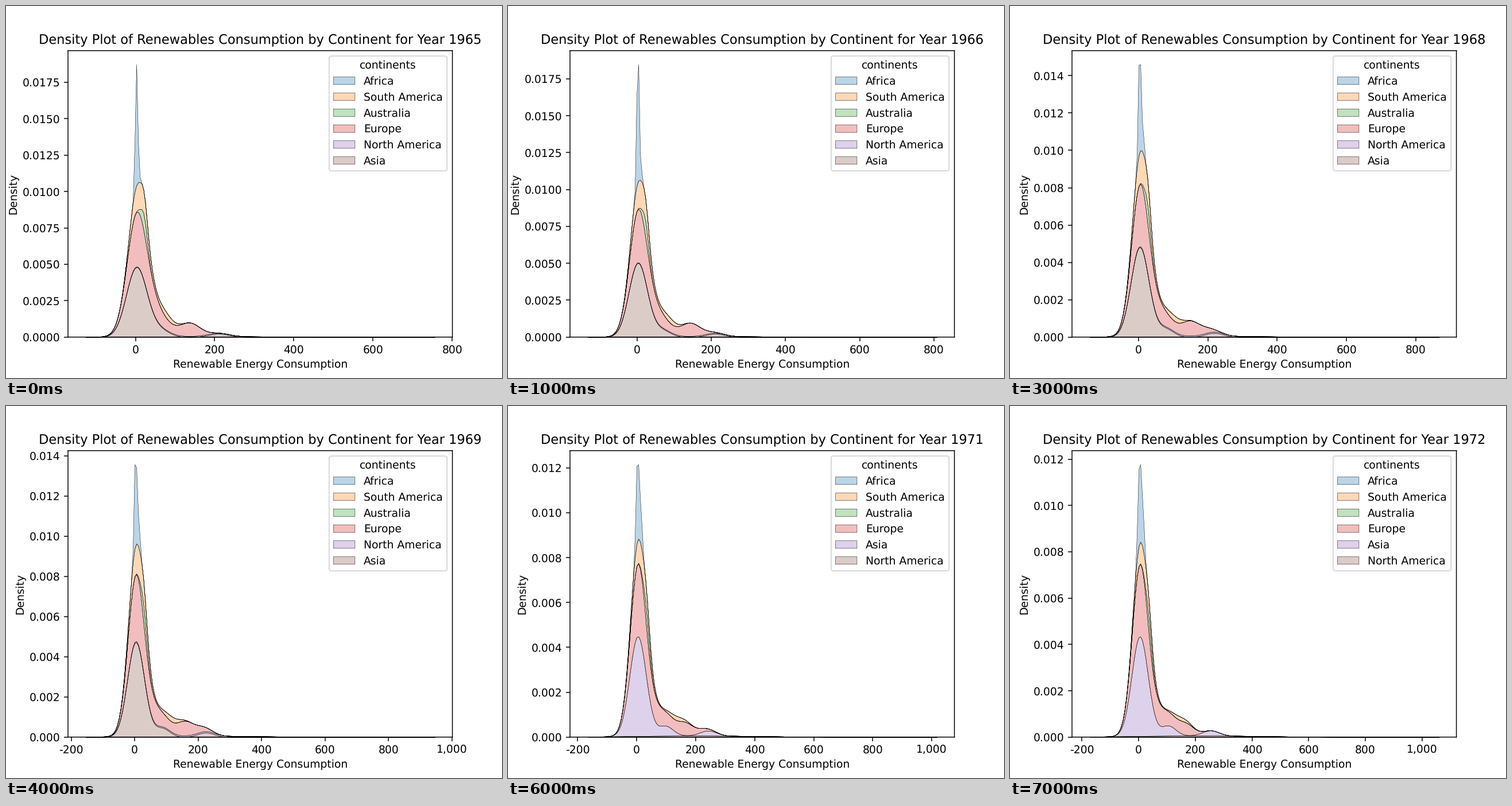
Write a matplotlib script that moves like this. It is 864 px wide and 648 px high and loops after 8000 ms.

```python
import numpy as np
import matplotlib.pyplot as plt
from matplotlib.animation import FuncAnimation
from matplotlib.patches import Patch
from matplotlib.ticker import FuncFormatter

plt.rcParams.update({"text.hinting": "none", "path.snap": False})

FIRST_YEAR, N_YEARS = 1965, 8
LINE = 0.25
UNIT = 1e-4  # unit of all heights below

# Overall kernel bandwidth, one value per year; it sets the x range.
SPREAD = [42.1, 44.4, 46.7, 47.4, 51.7, 52.5, 55.6, 57.9]

# Cumulative peak of each main layer at a few key years.
KEY_YEARS = [1965, 1967, 1968, 1970, 1972]
PEAKS = {
    "Asia": [48.0, 52.4, 48.1, 46.3, 43.4],
    "Europe": [86.0, 87.9, 82.1, 80.0, 74.8],
    "South America": [106.5, 106.5, 100.0, 92.5, 84.3],
    "Africa": [187.4, 182.3, 146.1, 125.4, 117.8],
}


def bell(x, center, width):
    return np.exp(-0.5 * ((x - center) / width) ** 2)


def fit(base, shape, top):
    """Scale shape so that base + shape peaks at top."""
    core = shape > 0.3 * shape.max()
    return shape * np.min((top - base[core]) / shape[core])


def layers(i):
    """Grid, layers from top to bottom, and the highest value."""
    year = FIRST_YEAR + i
    t = i / (N_YEARS - 1)
    peak = {k: np.interp(year, KEY_YEARS, v) for k, v in PEAKS.items()}
    bw = SPREAD[i]
    u = np.linspace(-3, 18.3 - 0.33 * 0.3 ** i, 200)
    x = u * bw
    w = 1250 / peak["Asia"] / bw  # kernel width shared by the broad layers
    asia_first = year >= 1971

    north = 0.65 * bell(u, 3.5, 4)

    bumps = (4.3 * bell(u, 1.5 + 0.3 * t, 0.9 * w)
             + 2.2 * bell(x, 210 + 44 * t ** 2, w * bw))
    base = north if asia_first else 0 * u
    asia = bumps + fit(base + bumps, bell(u, 0.07, w), peak["Asia"])
    total = north + asia

    bumps = ((11 - 3 * t) * bell(u, 1, 0.9 * w) + 4 * bell(u, 1.8, w)
             + (9 - 4 * t) * bell(u, 3.25 - 0.4 * t, w)
             + 9 * t * (1 - t) * bell(u, 4, w))
    europe = bumps + fit(total + bumps, bell(u, 0.07, 0.9 * w), peak["Europe"])
    total = total + europe

    australia = (12 - 5 * t) * bell(u, 0.53 + 0.08 * t, 0.18)
    total = total + australia

    bumps = ((7 - 2 * t) * bell(u, 0.65, 0.32)
             + (4 - 2.4 * t) * bell(u, 1.8 + 0.7 * t, 0.46))
    south = bumps + fit(total + bumps, bell(u, 0.1, 0.37), peak["South America"])
    total = total + south

    width = 3.1 + 2.5 * t ** 2
    spike = (bell(x, 2.1, width)
             + (0.03 + 0.4 * t) * bell(x, 10 + 4 * t, width))
    africa = fit(total, spike, peak["Africa"])

    stack = [("Africa", africa), ("South America", south),
             ("Australia", australia), ("Europe", europe)]
    lowest = [("North America", north), ("Asia", asia)]
    stack += lowest[::-1] if asia_first else lowest
    return x, stack, peak["Africa"]


fig, ax = plt.subplots(figsize=(6.4, 4.8), dpi=135)


def draw(i):
    ax.clear()
    x, stack, peak = layers(i)
    styles = [dict(facecolor=(f"C{k}", 0.3), edgecolor="black", linewidth=LINE)
              for k in range(len(stack))]

    floor = np.zeros_like(x)
    for (_, density), style in reversed(list(zip(stack, styles))):
        top = floor + density * UNIT
        ax.fill_between(x, floor, top, **style)
        floor = top

    pad = 0.05 * (x[-1] - x[0])
    ax.set_xlim(x[0] - pad, x[-1] + pad)
    ax.set_ylim(0, 1.05 * peak * UNIT)
    ax.xaxis.set_major_formatter(FuncFormatter(lambda v, _: f"{v:,.0f}"))
    ax.set_title("Density Plot of Renewables Consumption by Continent "
                 f"for Year {FIRST_YEAR + i}")
    ax.set_xlabel("Renewable Energy Consumption")
    ax.set_ylabel("Density")
    handles = [Patch(label=name, **style) for (name, _), style in zip(stack, styles)]
    ax.legend(handles=handles, title="continents", loc="upper right")
    return []


anim = FuncAnimation(fig, draw, frames=N_YEARS, interval=1000,
                     init_func=lambda: [], repeat=True, repeat_delay=0, blit=False)

plt.show()
```
